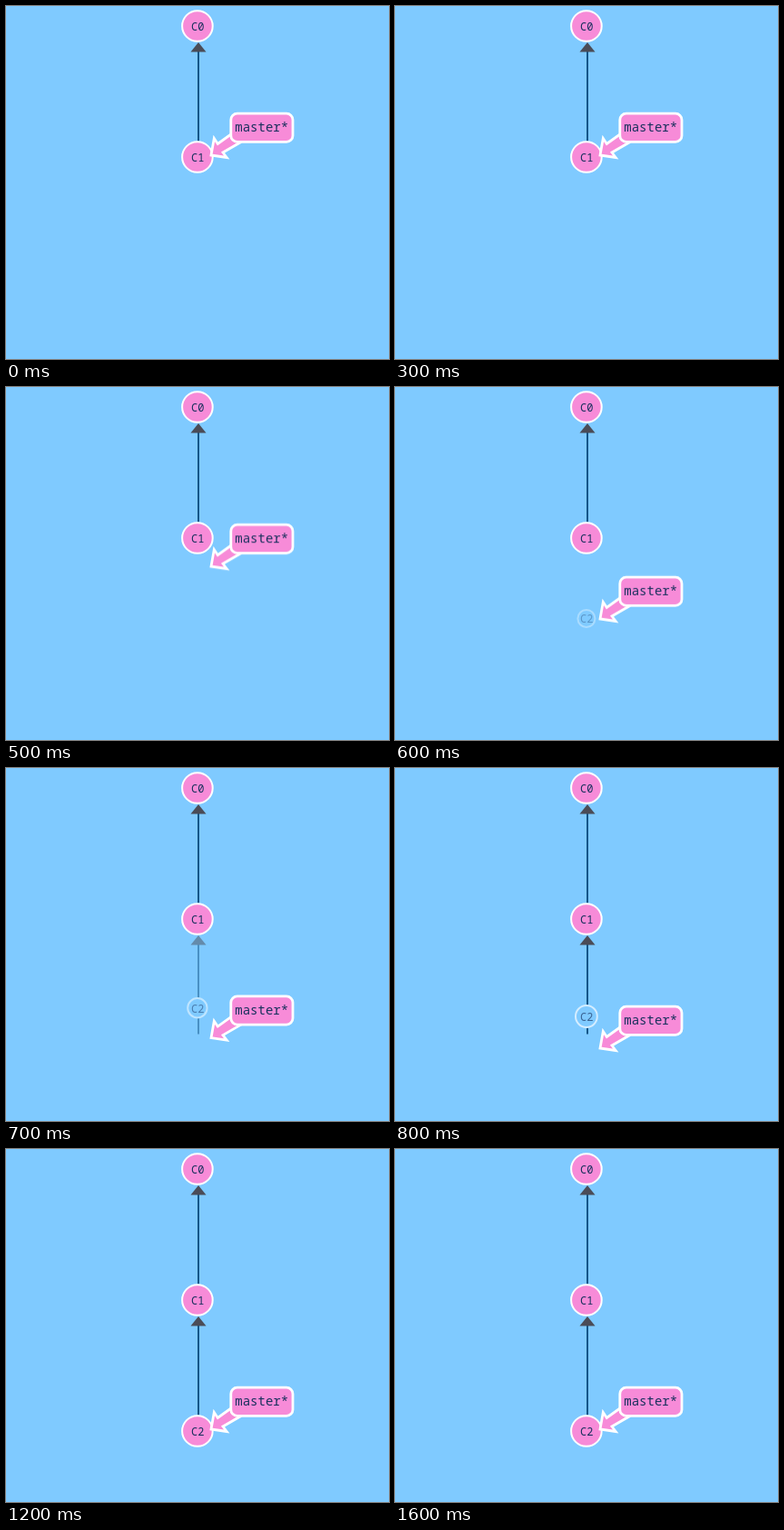
An HTML page that plays this animation: 422x388 px, repeating every 1.7 s.

```html
<!DOCTYPE html>
<html lang="en">
<head>
<meta charset="utf-8">
<title>Commit graph</title>
<style>
  html, body { margin: 0; width: 100%; height: 100%; overflow: hidden; background: #7fcaff; }
  svg { display: block; width: 422px; height: 388px; }
  circle { fill: #f78bd8; stroke: #fff; stroke-width: 2; }
  text { font: 12px "Noto Sans Mono", "DejaVu Sans Mono", monospace; fill: #17305c; text-anchor: middle; }
  .tag path, .tag rect { fill: #f78bd8; stroke: #fff; stroke-width: 2.8; }
  .tag text { font-size: 14px; }
  .edge line { stroke: #125688; stroke-width: 2; }
  .edge path { fill: #4b4c57; }
</style>
</head>
<body>
<svg viewBox="0 0 422 388">
  <defs>
    <g id="edge" class="edge">
      <line x1="212" y1="49" x2="212" y2="148.5"/>
      <path d="M212 40L220.5 50.5H203.5Z"/>
    </g>
  </defs>
  <use href="#edge"/>
  <use href="#edge" id="newEdge" y="144"/>
  <g transform="translate(210.9 22)"><circle r="16.8"/><text x=".3" y="4.8">C0</text></g>
  <g transform="translate(210.9 166)"><circle r="16.8"/><text x=".3" y="4.8">C1</text></g>
  <g id="node"><circle id="disc" r="16.8"/><text id="label" x=".3" y="4.8">C2</text></g>
  <g id="tag" class="tag">
    <path d="M226 164L229.3 145.5L233.3 151.5L250 139.5L258 150L239 161L243.2 166.5Z"/>
    <rect x="247.8" y="118.2" width="68.2" height="31.2" rx="7"/>
    <text x="281.7" y="138">master*</text>
  </g>
</svg>
<script>
const LOOP = 1700, STEP = 100, GAP = 144;

const progress = (t, from, to) => Math.min(1, Math.max(0, (t - from) / (to - from)));
const easeInOut = u => u < 0.5 ? 2 * u * u : 1 - 2 * (1 - u) ** 2;
const mix = (a, b, k) => `rgb(${a.map((v, i) => Math.round(v + (b[i] - v) * k))})`;
const sky = [127, 202, 255], pink = [247, 139, 216], ink = [23, 48, 92], white = [255, 255, 255];

// Sample a style rule once per step and hold each pose.
function play(id, style) {
  const frames = [];
  for (let t = 0; t <= LOOP; t += STEP) {
    frames.push({ offset: t / LOOP, easing: 'step-end', ...style(t) });
  }
  document.getElementById(id).animate(frames, { duration: LOOP, iterations: Infinity });
}

const grow = t => progress(t, 600, 1200);
const appear = t => progress(t, 400, 1000);

play('tag', t => ({
  transform: `translate(0px, ${GAP * easeInOut(progress(t, 353, 786))}px)`
}));

play('newEdge', t => ({ opacity: progress(t, 600, 800) }));

play('node', t => ({
  transform: `translate(210.9px, ${254.5 + 55.5 * grow(t)}px)`,
  opacity: t < 600 ? 0 : 1
}));

play('disc', t => ({
  r: `${9.5 + 7.3 * grow(t)}px`,
  fill: mix(sky, pink, progress(t, 800, 1100)),
  stroke: mix(sky, white, appear(t))
}));

play('label', t => ({ fill: mix(sky, ink, appear(t)) }));
</script>
</body>
</html>
```
